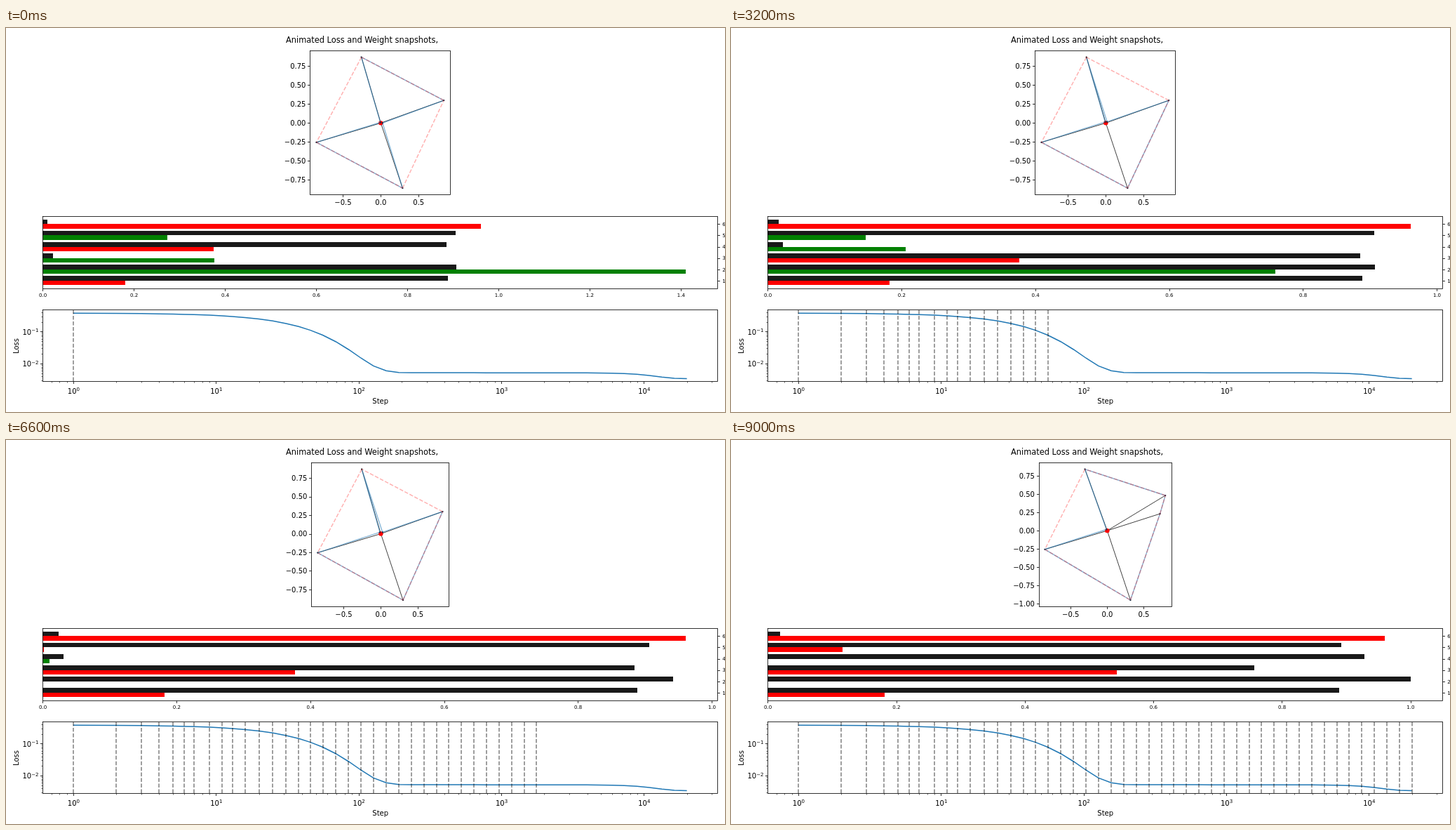
An HTML page for the animation above (9200 ms loop, 1025 by 547 pixels).

```html
<!DOCTYPE html>
<html lang="en">
<head>
<meta charset="utf-8">
<title>Loss and weight snapshots</title>
<style>
html, body { margin: 0; width: 100%; height: 100%; overflow: hidden; background: #fff; }
svg { display: block; font-family: "DejaVu Sans", sans-serif; font-size: 10px; }
.small { font-size: 7px; }
.axis { fill: none; stroke: #000; stroke-width: .8; }
.minor { stroke: #000; stroke-width: .6; }
.weight { stroke: #000; stroke-width: .75; }
.dash { stroke-width: 1.5; stroke-dasharray: 5.55 2.4; }
</style>
</head>
<body>
<svg id="chart" width="1025" height="547" viewBox="0 0 1025 547"></svg>
<script>
const FRAME_MS = 200;
const LEFT = 52.3, RIGHT = 1014.4, CENTER = (LEFT + RIGHT) / 2, WIDTH = RIGHT - LEFT;

// Fifty log-spaced steps up to 20000, truncated and without repeats
const steps = [...new Set(Array.from({ length: 50 }, (_, i) => Math.floor(20000 ** (i / 49) + 1e-6)))];

const mix = (a, b, t) => a + (b - a) * t;
const decay = (n, tau, power) => Math.exp(-((n / tau) ** power));
const lateGrowth = n => 1 / (1 + Math.exp((10900 - n) / 2200));
const loss = n => .37 * decay(n, 38.3, 1.294) + mix(.00524, .00338, lateGrowth(n));

// Five features settle early; one small feature grows late and pushes the others
function featuresAt(n) {
  const early = decay(n, 79.6, 1.345), late = lateGrowth(n);
  const feature = (norm, angle, bias) => {
    const a = angle * Math.PI / 180;
    return { norm, angle, bias, x: norm * Math.cos(a), y: norm * Math.sin(a) };
  };
  return [
    feature(.889, -163.3, .1816),
    feature(mix(1, .907, decay(n, 2800, 1.6)), -71.5, -1.414 * early),
    feature(mix(.0165, .943, late), 42 - 40 * decay(n, 20, 2) - 11 * late, -.367 * early - .01 * (1 - late)),
    feature(mix(.8865, .755, late), mix(19.75, 17.7, late), mix(.3745, .546, late)),
    feature(mix(.9065, .892, late), mix(106.4, 110, late), .1187 * late - .2755 * early),
    feature(.01 + .014 * (1 - early) - .005 * late, 122, .9606),
  ].sort((p, q) => p.angle - q.angle);
}

const snap = v => Math.floor(v + .5) + .5;
const line = (x1, y1, x2, y2, attrs = 'class="axis"') =>
  `<line x1="${x1}" y1="${y1}" x2="${x2}" y2="${y2}" ${attrs}/>`;
const rect = (x1, y1, x2, y2, attrs) =>
  `<rect x="${x1}" y="${y1}" width="${x2 - x1}" height="${y2 - y1}" ${attrs}/>`;
const frame = (x1, y1, x2, y2) => rect(snap(x1), snap(y1), snap(x2), snap(y2), 'class="axis"');
const xTick = (x, y, size = 3.5, style = 'axis') =>
  line(snap(x), snap(y), snap(x), snap(y) + size, `class="${style}"`);
const yTick = (x, y, size = -3.5, style = 'axis') =>
  line(snap(x), snap(y), snap(x) + size, snap(y), `class="${style}"`);
const text = (x, y, content, anchor = 'middle', attrs = '') =>
  `<text x="${x}" y="${y}" text-anchor="${anchor}" ${attrs}>${content}</text>`;
const number = (v, digits) => v.toFixed(digits).replace('-', '−');
const power = e => `10<tspan class="small" dy="-3.9">${number(e, 0)}</tspan>`;

function weightPlot(points) {
  const top = 32.3, bottom = 237.4, height = bottom - top;
  const xs = points.map(p => p.x), ys = points.map(p => p.y);
  const minX = Math.min(...xs), maxX = Math.max(...xs);
  const minY = Math.min(...ys), maxY = Math.max(...ys);
  const scale = height / 1.1 / (maxY - minY);
  const half = .55 * (maxX - minX) * scale;
  const px = x => CENTER + (x - (minX + maxX) / 2) * scale;
  const py = y => top + height / 2 - (y - (minY + maxY) / 2) * scale;
  const left = CENTER - half, right = CENTER + half;
  const join = (p, q, attrs) => line(px(p.x), py(p.y), px(q.x), py(q.y), attrs);
  const origin = { x: 0, y: 0 };

  let out = points.map(p => join(origin, p, 'class="weight"')).join('');
  out += `<circle cx="${px(0)}" cy="${py(0)}" r="3.2" fill="red"/>`;
  for (const p of points) out += `<circle cx="${px(p.x)}" cy="${py(p.y)}" r="1.1"/>`;
  const outline = points.map(p => `${px(p.x)},${py(p.y)}`).join(' ');
  out += `<polygon points="${outline}" fill="none" stroke="#1f77b4" stroke-width="1.4" opacity=".55"/>`;

  // An edge is on the hull when every point lies on its left side
  for (const p of points) for (const q of points) {
    const outer = p !== q && points.every(r =>
      (q.x - p.x) * (r.y - p.y) - (q.y - p.y) * (r.x - p.x) >= -1e-9);
    if (outer) out += join(p, q, 'class="dash" stroke="red" opacity=".3"');
  }

  out += frame(left, top, right, bottom);
  for (let v = -1; v <= 1; v += .25) {
    const x = px(v), y = py(v);
    if (y > top && y < bottom) out += yTick(left, y) + text(left - 6, y + 3.8, number(v, 2), 'end');
    if (Math.abs(v) <= .5 && v % .5 === 0) out += xTick(x, bottom) + text(x, 252.3, number(v, 1));
  }
  return out;
}

function barPlot(points) {
  const top = 268.3, bottom = 370.8;
  const max = Math.max(...points.flatMap(p => [p.norm, Math.abs(p.bias)]));
  const unit = WIDTH / 1.05 / max;
  const row = (bottom - top) / 1.1 / 5.8, thick = .4 * row;
  const bar = (y, value, color) => rect(Math.round(LEFT), Math.round(y),
    Math.round(LEFT + value * unit), Math.round(y + thick), `fill="${color}"`);
  let out = '';
  points.forEach((p, i) => {
    const y = (top + bottom) / 2 + (2.5 - i) * row;
    out += bar(y - thick, p.norm, '#191919');
    out += bar(y, Math.abs(p.bias), p.bias < 0 ? 'green' : 'red');
    out += yTick(RIGHT, y, 3.5) + text(1021.3, y + 2.9, i + 1, 'start', 'class="small"');
  });
  for (let v = 0; v <= max * 1.05; v += .2) {
    const x = LEFT + v * unit;
    out += xTick(x, bottom) + text(x + .3, 382.8, number(v, 1), 'middle', 'class="small"');
  }
  return out + frame(LEFT, top, RIGHT, bottom);
}

function lossPlot(k) {
  const top = 400.9, bottom = 503.4;
  const decade = WIDTH / 1.1 / Math.log10(20000);
  const toX = n => LEFT + WIDTH * .05 / 1.1 + decade * Math.log10(n);
  const toY = v => 386.6 - 45.8 * Math.log10(v);
  const curve = steps.map(n => `${toX(n)},${toY(loss(n))}`).join(' ');
  let out = `<polyline points="${curve}" fill="none" stroke="#1f77b4" stroke-width="1.5"/>`;
  for (const n of steps.slice(0, k + 1)) {
    const x = Math.round(toX(n));
    out += line(x, Math.round(bottom), x, Math.round(top), 'class="dash" stroke="#000" opacity=".5"');
  }
  out += frame(LEFT, top, RIGHT, bottom);

  for (let e = -3; e <= 4; e++) for (let m = 1; m < 10; m++) {
    const x = toX(m * 10 ** e), y = toY(m * 10 ** e), major = m === 1;
    const size = major ? 3.5 : 2, style = major ? 'axis' : 'minor';
    if (x > LEFT && x < RIGHT) {
      out += xTick(x, bottom, size, style);
      if (major) out += text(x + .4, 520.8, power(e));
    }
    if (y > top && y < bottom) {
      out += yTick(LEFT, y, -size, style);
      if (major) out += text(46.5, y + 4.2, power(e), 'end');
    }
  }
  return out + text(533.7, 534.8, 'Step') +
    text(0, 0, 'Loss', 'middle', 'transform="translate(18 453) rotate(-90)"');
}

function render(k) {
  const points = featuresAt(steps[k]);
  const title = text(399, 20.5, 'Animated Loss and Weight snapshots,', 'start', 'font-size="11.4"');
  document.getElementById('chart').innerHTML = title + weightPlot(points) + barPlot(points) + lossPlot(k);
}

let shown = -1;
function tick() {
  const k = Math.floor(performance.now() / FRAME_MS) % steps.length;
  if (k !== shown) render(shown = k);
  requestAnimationFrame(tick);
}
tick();
</script>
</body>
</html>
```
